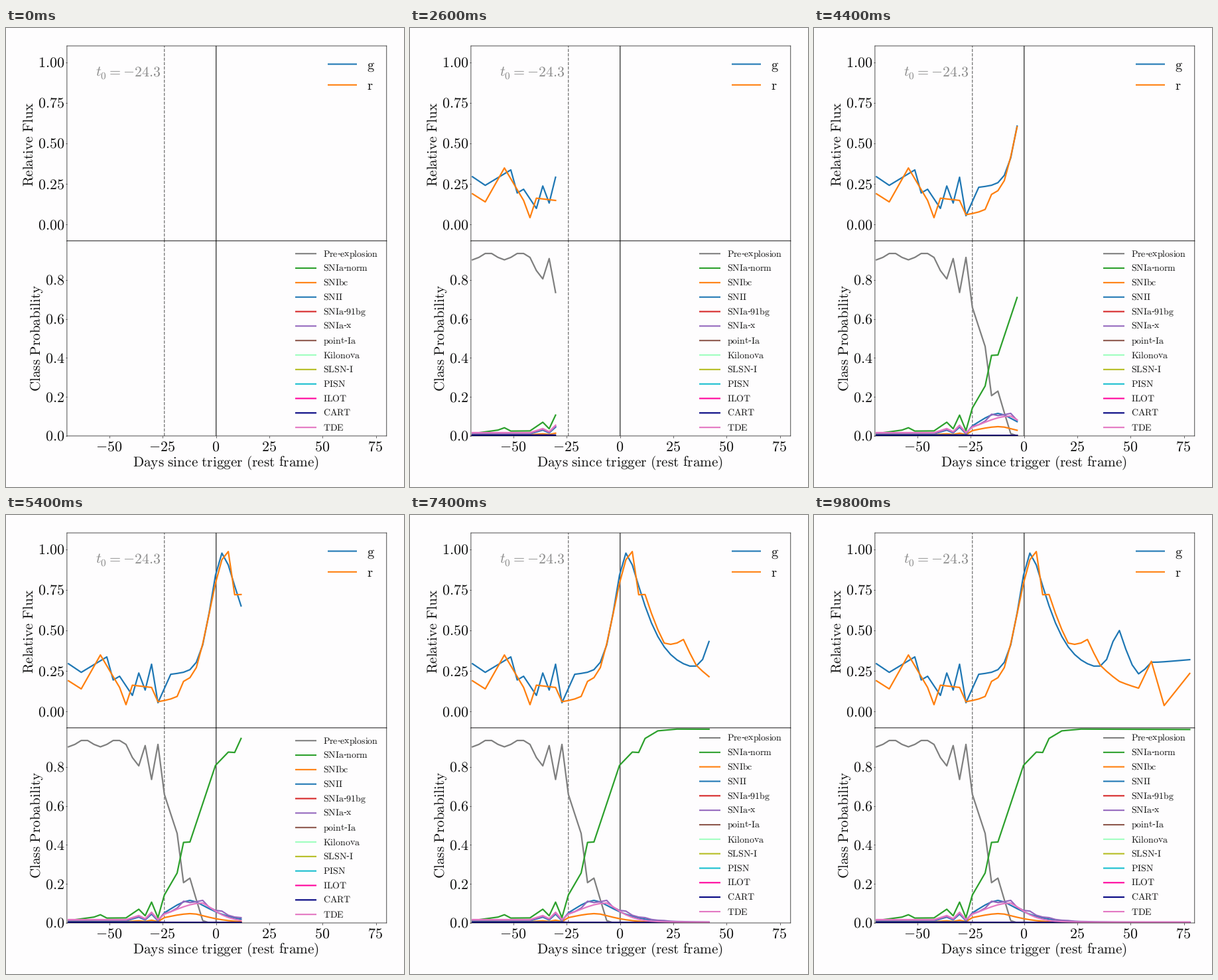
Animation of 600 by 692 pixels, one loop 10 s. Source, as a matplotlib script:

```python
import numpy as np
import matplotlib.pyplot as plt
from matplotlib.animation import FuncAnimation

plt.rcParams.update({
    "font.family": "Liberation Serif",
    "mathtext.fontset": "cm",
    "text.hinting": "none",
})

W, H, DPI = 600, 692, 100
STEPS = 50
LEFT, RIGHT, TOP, MID, BOTTOM = 91.9, 573.8, 27, 321, 615
PAPER, INK = "#fefdfe", "#111111"
T0 = -24.3
n = np.arange(STEPS)
days = -69.3 + 3.0 * n


def path(*points):
    """Straight segments through (step, value) points."""
    return np.interp(n, *zip(*points))


def bump(peak, height, rise, fall):
    """Gaussian rise, slower decay."""
    u = n - peak
    drop = np.where(u < 0, np.abs(u / rise) ** 2, np.abs(u / fall) ** 1.34)
    return height * np.exp(-drop)


# Two false alarms that every class reacts to before the explosion.
flare = path((9, 0), (11, .55), (12, .13), (13, 1), (14, 0))


def minor(early, late=.002, gain=0, hump=0):
    """Low class: flat with flares at first, a hump after the explosion."""
    return np.where(n < 15, early + gain * flare, late + hump)


flux = {
    "g": ("#1f77b4",
          path((0, .295), (2, .242), (6, .337), (7, .195), (8, .218), (10, .1),
               (11, .238), (12, .133), (13, .292), (14, .055), (16, .23),
               (20, .25), (35, .25), (41, .2), (43, .3), (49, .32))
          + bump(24.2, .73, 2.6, 4.1) + bump(38, .27, 1.7, 1.7)),
    "r": ("#ff7f0e",
          path((0, .19), (2, .14), (5, .349), (8, .149), (9, .043), (10, .163),
               (13, .149), (14, .061), (17, .08), (18, .15), (20, .1),
               (25, .16), (26, 0), (27, .13), (30, .15), (33, .34), (35, .235),
               (38, .17), (41, .14), (43, .308), (45, .037), (49, .235))
          + bump(24.9, .83, 3.9, 4.7)),
}

wobble = .92 - .018 * np.cos(2 * np.pi * n / 5)
ripple = 1 + .13 * np.cos(2 * np.pi * n / 3)

classes = {
    "Pre-explosion": ("#7f7f7f", .001 - .2 * flare + wobble * path(
        (14, 1), (15, .73), (17, .49), (18, .22), (19, .25), (21, .012), (22, 0))),
    "SNIa-norm": ("#2ca02c", .08 * flare + path(
        (0, .012), (4, .03), (5, .042), (6, .025), (14, .027), (15, .143),
        (17, .256), (18, .413), (19, .415), (23, .808), (25, .876),
        (26, .874), (27, .946), (29, .985), (32, .994), (49, .992))),
    "SNIbc": ("#ff7f0e", minor(.007, gain=.007, hump=bump(19.5, .046, 5.8, 4))),
    "SNII": ("#1f77b4", minor(.011, .003, .034, bump(19.3, .113, 4.7, 4.7))),
    "SNIa-91bg": ("#d62728", minor(.004, .003)),
    "SNIa-x": ("#9467bd", minor(.013, .004, .037, ripple * bump(20, .112, 4.9, 4.7))),
    "point-Ia": ("#8c564b", minor(.005)),
    "Kilonova": ("#9fffbf", minor(.002, .001)),
    "SLSN-I": ("#b5bd22", minor(.002, .001)),
    "PISN": ("#17becf", minor(.004, .001)),
    "ILOT": ("#ff009c", minor(.002, .001)),
    "CART": ("#000080", minor(.003)),
    "TDE": ("#e377c2", minor(.017, .004, .038, bump(21, .098, 6.4, 3.1))),
}


def roman(s):
    return "-".join(r"$\mathrm{%s}$" % part.replace(" ", r"\ ")
                    for part in s.split("-"))


fig = plt.figure(figsize=(W / DPI, H / DPI), dpi=DPI, facecolor=PAPER)


def panel(top, bottom, ylim):
    ax = fig.add_axes([LEFT / W, 1 - bottom / H, (RIGHT - LEFT) / W, (bottom - top) / H])
    ax.set(xlim=(-70, 80), ylim=ylim, facecolor=PAPER)
    ax.tick_params(length=1.8, width=0.45, labelleft=False, labelbottom=False)
    for spine in ax.spines.values():
        spine.set(linewidth=0.5, snap=False)
    ax.axvline(0, color="black", lw=0.75, snap=False)
    ax.axvline(T0, color="#707070", lw=0.9, ls="--", snap=False)
    return ax


upper = panel(TOP, MID, (-0.1, 1.1))
lower = panel(MID, BOTTOM, (0, 1))
upper.set(xticks=[], yticks=[0, .25, .5, .75, 1])
lower.set(xticks=range(-50, 76, 25), yticks=[0, .2, .4, .6, .8])

# Overlay measured in pixels from the top left corner.
page = fig.add_axes([0, 0, 1, 1])
page.set(xlim=(0, W), ylim=(H, 0))
page.axis("off")


def write(x, y, s, size, ha="left", color=INK, rotation=0):
    return page.text(x, y, s, size=size, ha=ha, va="baseline", color=color,
                     rotation=rotation, rotation_mode="anchor")


def key(x0, x1, y, color):
    return page.plot([x0, x1], [y, y], color=color, lw=1.5,
                     solid_capstyle="butt", snap=False)[0]


def curve(ax, color, values):
    return ax.plot([], [], color=color, lw=1.6)[0], values


for v in upper.get_yticks():
    write(88.5, 296.5 - 245 * v + 8, roman(f"{v:.2f}"), 15.9, "right")
for v in lower.get_yticks():
    write(88.5, BOTTOM - 294 * v + 8, roman(f"{v:.1f}"), 15.9, "right")
for v in lower.get_xticks():
    x = LEFT + (v + 70) * (RIGHT - LEFT) / 150
    write(x - 1, 638.3, f"${v:.0f}$", 15.9, "center")

write(331, 661.5, roman("Days since trigger (rest frame)"), 15.3, "center")
write(42, 175, roman("Relative Flux"), 15.3, "center", rotation=90)
write(52.5, 467.5, roman("Class Probability"), 15.3, "center", rotation=90)
write(233.5, 72.5, "$t_0={-}%.1f$" % -T0, 15.8, "right", "#8c8c8c")

curves = []
for k, (name, (color, values)) in enumerate(flux.items()):
    y = 54.5 + 31.3 * k
    key(485, 529, y, color)
    write(544.5, y + 7.3, roman(name), 14.8)
    curves.append(curve(upper, color, values))

legend = []
for k, (name, (color, values)) in enumerate(classes.items()):
    y = 336 + 21.83 * k
    legend.append((key(436, 468, y, color),
                   write(478, y + 4.8, roman(name), 10), y))
    curves.append(curve(lower, color, values))


def update(i):
    for line, values in curves:
        line.set_data(days[:i + 1], values[:i + 1])
    # The legend moves up once the curves reach its left edge.
    shift = 4.2 if days[i] < 35 else 0
    for handle, label, y in legend:
        handle.set_ydata([y + shift] * 2)
        label.set_y(y + shift + 4.8)
    return []


anim = FuncAnimation(fig, update, frames=STEPS, interval=200,
                     init_func=lambda: update(0), repeat=True, repeat_delay=0)
plt.show()
```
